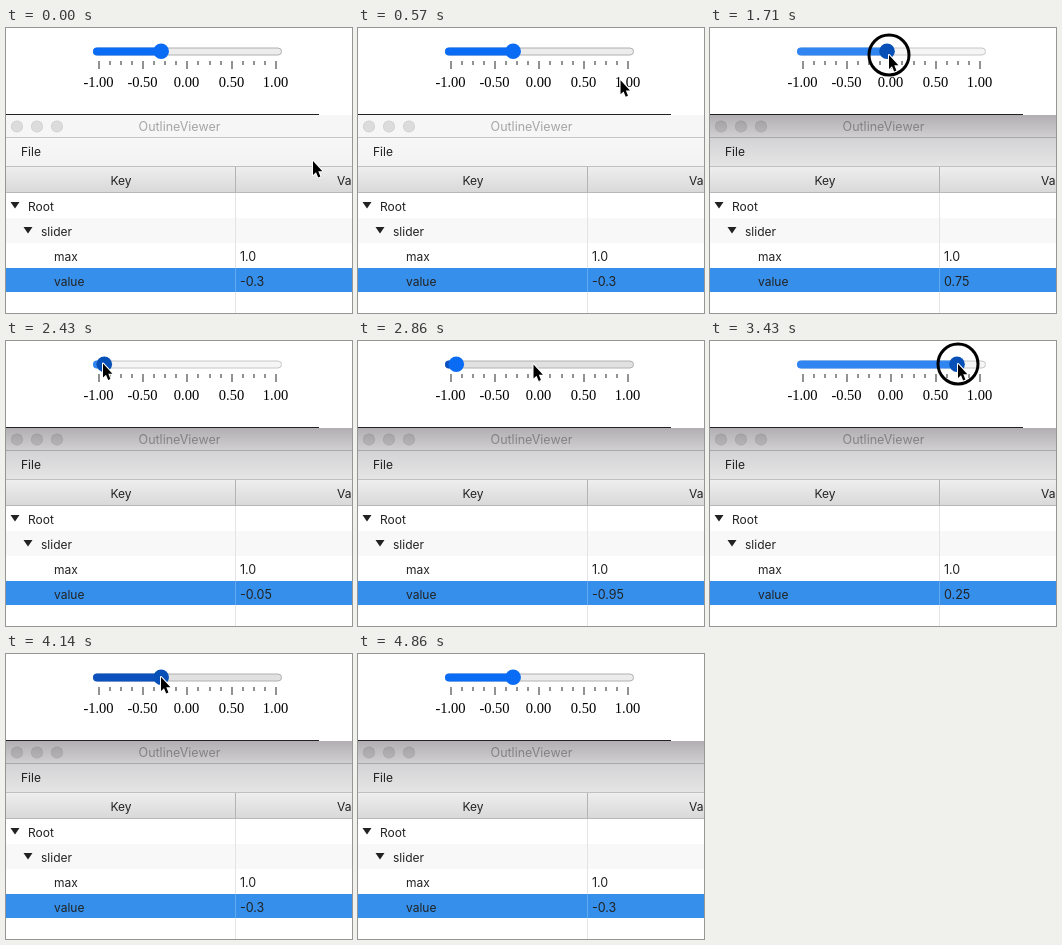
Write an HTML page with a canvas that moves like this. It is 346 px wide and 285 px high and loops after 5.28 s.

```html
<!DOCTYPE html>
<html lang="en">
<head>
<meta charset="utf-8">
<title>Slider and outline</title>
<style>
  html, body { margin: 0; width: 100%; height: 100%; overflow: hidden; background: #fff; }
  canvas { display: block; width: 346px; height: 285px; }
</style>
</head>
<body>
<canvas id="stage" width="346" height="285"></canvas>
<script>
const ctx = document.getElementById('stage').getContext('2d');
const LOOP = 5280;
const SANS = 'Inter, sans-serif';
const SERIF = '"Liberation Serif", serif';
const ACTIVATE_STEP = 6;

// Pointer stops: step, x, y
const path = [
  [0, 307, 133], [6, 247, 24], [9, 247, 24], [12, 179, 27], [13, 179, 27],
  [16, 97, 23], [18, 97, 22], [21, 203, 24], [22, 203, 24], [24, 248, 23],
  [25, 248, 22], [27, 155, 23], [29, 155, 23], [32, 352, 60]
];

const clicks = [
  { press: 8, ring: 8, release: 10, value: 0.75 },
  { press: 12, ring: 12, release: 14, value: -0.05 },
  { press: 17, ring: 18, release: 19, value: -0.95 },
  { press: 21, ring: 21, release: 22, value: 0.25 },
  { press: 24, ring: 24, release: 26, value: 0.75 },
  { press: 27, ring: 27, release: 29, value: -0.3 }
];

const thumbX = value => 181.4 + 87.5 * value;
const tickX = value => 181.4 + 88.5 * value;
const ease = u => u * u * (3 - 2 * u);

function pointerAt(step) {
  const next = path.findIndex(p => p[0] > step);
  if (next < 0) return null;
  const [s0, x0, y0] = path[next - 1];
  const [s1, x1, y1] = path[next];
  const u = ease((step - s0) / (s1 - s0));
  return { x: x0 + (x1 - x0) * u, y: y0 + (y1 - y0) * u };
}

function latestValue(step, phase) {
  return clicks.reduce((v, c) => c[phase] <= step ? c.value : v, -0.3);
}

function rect(x, y, w, h, color) {
  ctx.fillStyle = color;
  ctx.fillRect(x, y, w, h);
}

function gradient(y0, y1, ...colors) {
  const g = ctx.createLinearGradient(0, y0, 0, y1);
  colors.forEach((color, i) => g.addColorStop(i / (colors.length - 1), color));
  return g;
}

function disc(x, y, r, color) {
  ctx.fillStyle = color;
  ctx.beginPath();
  ctx.arc(x, y, r, 0, 2 * Math.PI);
  ctx.fill();
}

function text(label, x, y, { size = 12, family = SANS, color = '#222', align = 'left' } = {}) {
  ctx.font = `${size}px ${family}`;
  ctx.textAlign = align;
  ctx.fillStyle = color;
  ctx.fillText(label, x, y);
}

function polygon(points, color) {
  ctx.fillStyle = color;
  ctx.beginPath();
  points.forEach(([x, y]) => ctx.lineTo(x, y));
  ctx.closePath();
  ctx.fill();
}

function drawSlider(step, pointer, pressed) {
  const x = thumbX(latestValue(step, 'press'));
  const over = step >= ACTIVATE_STEP && pointer && pointer.x > 86 && pointer.x < 277 &&
    Math.abs(pointer.y - 23) < 9;
  const overThumb = over && Math.abs(pointer.x - x) < 8;

  ctx.beginPath();
  ctx.roundRect(87.5, 20, 188, 7, 3.5);
  ctx.fillStyle = pressed ? '#f5f5f5' : over ? '#e1e1e1' : '#ececec';
  ctx.fill();
  ctx.strokeStyle = pressed ? '#c6c6c6' : '#b0b0b0';
  ctx.lineWidth = 1;
  ctx.stroke();

  ctx.beginPath();
  ctx.roundRect(87, 19.5, x - 87, 8, 4);
  ctx.fillStyle = pressed ? '#3085f0' : over ? '#0b50bd' : '#0a6cf5';
  ctx.fill();
  disc(x, 23.3, 7.8, pressed || overThumb ? '#0650b8' : '#0a6cf5');

  for (let i = 0; i <= 16; i++) {
    const value = i / 8 - 1;
    const major = i % 4 === 0;
    const center = Math.round(tickX(value));
    rect(center - 1, 33, 2, major ? 8 : 4, '#929292');
    if (major) {
      text(value.toFixed(2), center - 0.5, 59,
        { size: 14.5, family: SERIF, color: '#000', align: 'center' });
    }
  }
}

function drawTitleBar() {
  rect(0, 86, 313, 1, '#222');
  rect(0, 87, 346, 23, '#f6f6f6');
  for (const x of [11, 31, 51]) {
    disc(x, 98.5, 6, '#cfcfcf');
    disc(x, 98.5, 5.2, '#dcdcdc');
  }
  text('OutlineViewer', 173.5, 103, { size: 12.5, color: '#a6a6a6', align: 'center' });
  rect(0, 109, 346, 1, '#c6c6c6');
}

function drawMenu() {
  rect(0, 110, 346, 28, gradient(110, 138, '#f7f7f7', '#f3f3f3'));
  text('File', 15, 128);
}

// The browser window in front darkens the title bar and menu once it is active.
function drawShadow() {
  rect(0, 87, 346, 51, gradient(87, 138,
    'rgba(10,0,14,.29)', 'rgba(10,0,14,.14)', 'rgba(10,0,14,.06)'));
}

function drawTable(value) {
  rect(0, 138, 346, 27, gradient(138, 165, '#efefef', '#d8d8d8'));
  rect(0, 138, 346, 1, '#c0c0c0');
  rect(0, 164, 346, 1, '#b8b8b8');
  rect(229, 139, 1, 25, '#b4b4b4');
  text('Key', 115, 157, { align: 'center' });
  text('Value', 331, 157);

  rect(0, 165, 346, 120, '#fff');
  rect(0, 190, 346, 25, '#f8f8f8');
  rect(229, 165, 1, 120, '#e4e4e4');
  rect(0, 240, 346, 24, '#3690eb');
  rect(229, 240, 1, 24, '#62a9ef');

  for (const [x, y] of [[4.5, 174], [17.5, 199]]) {
    polygon([[x, y], [x + 9, y], [x + 4.5, y + 6.5]], '#222');
  }
  text('Root', 22, 183);
  text('slider', 35, 208);
  text('max', 48, 233);
  text('1.0', 234, 233, { size: 12.5 });
  text('value', 48, 258);
  text(String(value), 234, 258, { size: 12.5 });
}

function drawPointer({ x, y }) {
  ctx.save();
  ctx.translate(x, y);
  ctx.beginPath();
  [[0, 0], [0, 14], [3, 11.2], [5.2, 16.4], [7.4, 15.4], [5.3, 10.2], [9.4, 10.2]]
    .forEach(p => ctx.lineTo(...p));
  ctx.closePath();
  ctx.lineJoin = 'round';
  ctx.strokeStyle = '#fff';
  ctx.lineWidth = 2;
  ctx.stroke();
  ctx.fillStyle = '#000';
  ctx.fill();
  ctx.restore();
}

function draw(time) {
  const step = Math.floor((time % LOOP + 5) * 7 / 1000);
  const pointer = pointerAt(step);
  const click = clicks.find(c => step >= c.press && step < c.release);

  rect(0, 0, 346, 285, '#fff');
  drawSlider(step, pointer, Boolean(click));
  drawTitleBar();
  drawMenu();
  if (step >= ACTIVATE_STEP) drawShadow();
  drawTable(latestValue(step, 'release'));

  if (click && step >= click.ring) {
    ctx.beginPath();
    ctx.arc(pointer.x, pointer.y, 20, 0, 2 * Math.PI);
    ctx.strokeStyle = '#000';
    ctx.lineWidth = 3;
    ctx.stroke();
  }
  if (pointer) drawPointer(pointer);
}

const start = performance.now();
function tick() {
  draw(performance.now() - start);
  requestAnimationFrame(tick);
}
tick();
</script>
</body>
</html>
```
